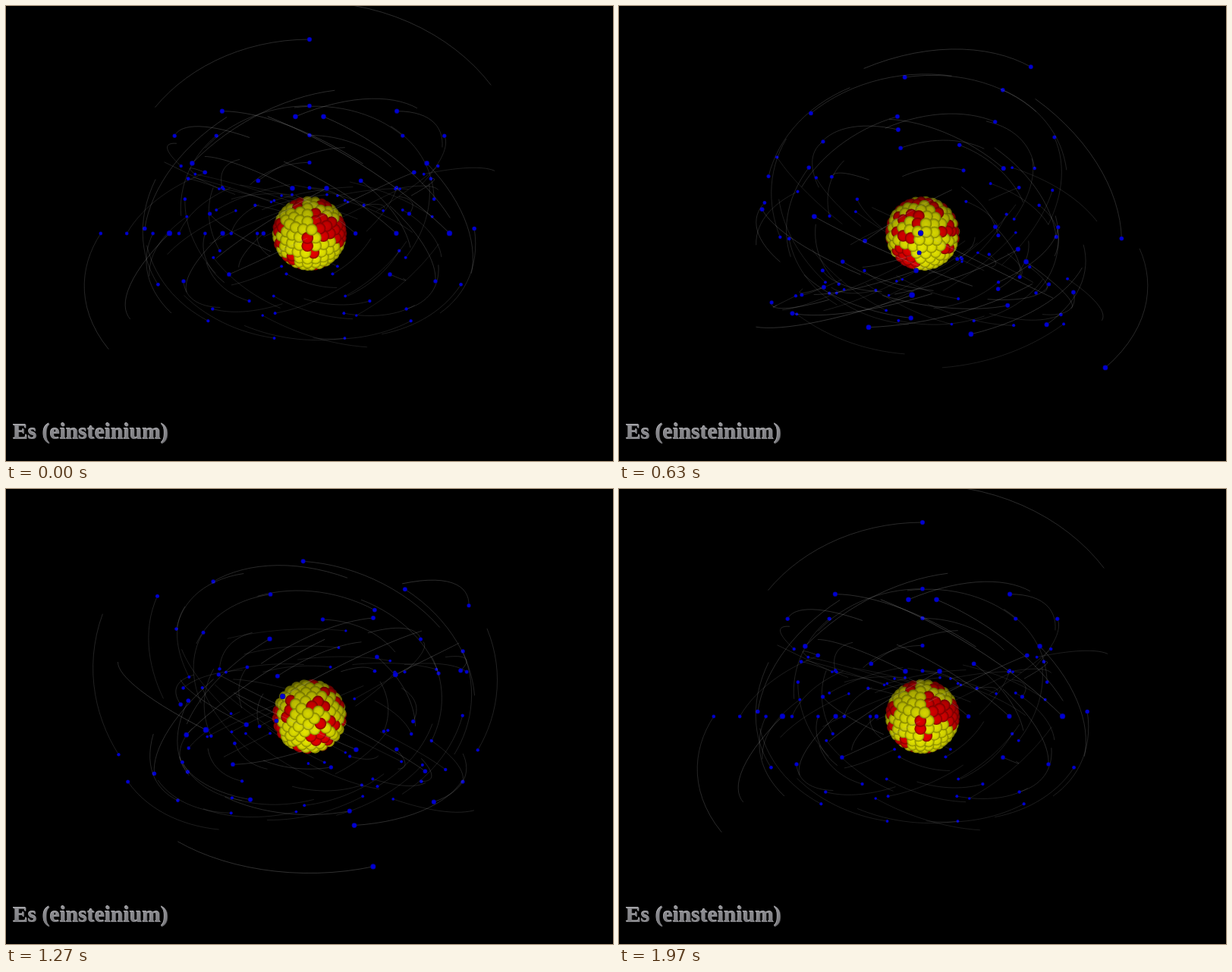
Write an HTML page with a canvas that moves like this. It is 800 px wide and 600 px high and loops after 2000 ms.

```html
<!DOCTYPE html>
<html>
<head>
<meta charset="utf-8">
<style>
html, body { margin: 0; width: 100%; height: 100%; overflow: hidden; background: #000; }
canvas { display: block; }
</style>
</head>
<body>
<canvas id="stage" width="800" height="600"></canvas>
<script>
const ctx = document.getElementById('stage').getContext('2d');
const TAU = Math.PI * 2, RAD = TAU / 360;
const { sin, cos, floor, round, abs, hypot } = Math;
const TILT = 35.2 * RAD, CAMERA = 600, STEPS = 59;

// World axes: x right, y up, z towards the viewer. The camera looks down by TILT.
function project(x, y, z) {
  const up = y * cos(TILT) - z * sin(TILT);
  const near = y * sin(TILT) + z * cos(TILT);
  const k = 1 - near / CAMERA;
  return { x: 400 + x / k, y: 300 - up / k, k, near };
}

function disc(x, y, r, fill) {
  ctx.fillStyle = fill;
  ctx.beginPath();
  ctx.arc(x, y, r, 0, TAU);
  ctx.fill();
}

// Shells: electron count and how many turns the start phases make.
const SHELLS = [[2, 1], [8, 3], [18, 5], [32, 3], [29, 2], [8, 3], [2, 1]];
const electrons = [];
SHELLS.forEach(([count, turns], n) => {
  const top = floor(count / 2);
  for (let j = top - count + 1; j <= top; j++) {
    const phi = j * 180 / count * RAD, theta = TAU / 4 - abs(phi);
    const phase = ((j < 0 ? 90 : -90) - turns * 360 / count * j) * RAD;
    electrons.push({
      r: 34.4 * (n + 2),
      phase,
      dir: n % 2 ? 1 : -1,
      a: [-cos(theta) * sin(phi), cos(theta) * cos(phi), sin(theta)],
      b: [cos(phi), sin(phi), 0]
    });
  }
});

function place(e, angle) {
  const c = cos(angle) * e.r, s = sin(angle) * e.r;
  return project(...e.a.map((v, i) => v * c + e.b[i] * s));
}

function drawElectrons(turn, front) {
  ctx.lineWidth = 0.8;
  for (const e of electrons) {
    const head = e.phase + e.dir * turn;
    let p = place(e, head);
    const dot = p;
    for (let i = 1; i <= 15; i++) {
      const q = place(e, head - e.dir * i * 3 * RAD);
      if (q.near > 0 === front) {
        ctx.strokeStyle = `rgba(170,170,170,${0.24 / q.k})`;
        ctx.beginPath();
        ctx.moveTo(p.x, p.y);
        ctx.lineTo(q.x, q.y);
        ctx.stroke();
      }
      p = q;
    }
    if (dot.near > 0 === front) {
      const r = 2.4 / dot.k;
      disc(dot.x, dot.y, r, '#0000a0');
      disc(dot.x, dot.y, r * 0.75, '#0000d4');
    }
  }
}

// Red patches on the side that faces the viewer at the start: dx, dy, radius.
const PATCHES = [[22, -2, 13], [33, -9, 9], [10, -22, 8], [38, 5, 9], [-2, 10, 7], [5, 24, 6],
  [-25, 33, 8], [-40, -10, 8], [-12, -38, 8], [20, -36, 6], [-40, 12, 6]];
const BALL = 7.3, CORE = 42, ROWS = 13;
const nucleons = [];
let seed = 7;
const random = () => (seed = seed * 16807 % 2147483647) / 2147483647;
for (let row = 0; row < ROWS; row++) {
  const lat = (row + 0.5) / ROWS * Math.PI, count = round(2 * ROWS * sin(lat));
  for (let i = 0; i < count; i++) {
    const lon = (i + row % 2 / 2) / count * TAU;
    const pos = [CORE * sin(lat) * cos(lon), CORE * cos(lat), CORE * sin(lat) * sin(lon)];
    const p = project(...pos), chance = random() < 0.36;
    const red = p.near > 0
      ? PATCHES.some(([x, y, r]) => hypot(p.x - 400 - x, p.y - 300 - y) < r)
      : chance;
    nucleons.push({ pos, red });
  }
}

function drawNucleus(turn) {
  const c = cos(turn), s = sin(turn);
  disc(400, 300, 44, '#2a2200');
  nucleons.map(({ pos: [x, y, z], red }) => {
    const y1 = y * c - z * s, z1 = y * s + z * c;
    const z2 = z1 * c + x * s;
    return { red, light: z2 / CORE, ...project(x * c - z1 * s, y1, z2) };
  }).filter(p => p.near > -12).sort((a, b) => a.near - b.near).forEach(p => {
    const r = BALL / p.k, bright = 0.7 + 0.3 * p.light;
    const shade = v => {
      const l = round(v * bright);
      return p.red ? `rgb(${l},0,0)` : `rgb(${l},${l},0)`;
    };
    const g = ctx.createRadialGradient(p.x, p.y + 1, 0, p.x, p.y, r);
    g.addColorStop(0, shade(232));
    g.addColorStop(0.65, shade(216));
    g.addColorStop(1, shade(130));
    disc(p.x, p.y, r, g);
  });
}

function drawLabel() {
  ctx.font = 'bold 29.6px "Liberation Serif", serif';
  const metal = ctx.createLinearGradient(0, 547, 0, 577);
  metal.addColorStop(0, '#98989c');
  metal.addColorStop(1, '#77777b');
  [[0.8, 0.8, '#48484a'], [-0.5, -0.5, '#b4b4b8'], [0, 0, metal]].forEach(([dx, dy, fill]) => {
    ctx.fillStyle = fill;
    ctx.fillText('Es (einsteinium)', 9 + dx, 570.5 + dy);
  });
}

function draw(now) {
  const t = now % 2000, part = t % 100;
  const step = floor(t / 100) * 3 + (part >= 30) + (part >= 70);
  const turn = step / STEPS * TAU;
  ctx.fillStyle = '#000';
  ctx.fillRect(0, 0, 800, 600);
  drawElectrons(2 * turn, false);
  drawNucleus(turn);
  drawElectrons(2 * turn, true);
  drawLabel();
}

function loop() {
  draw(performance.now());
  requestAnimationFrame(loop);
}
loop();
</script>
</body>
</html>
```
